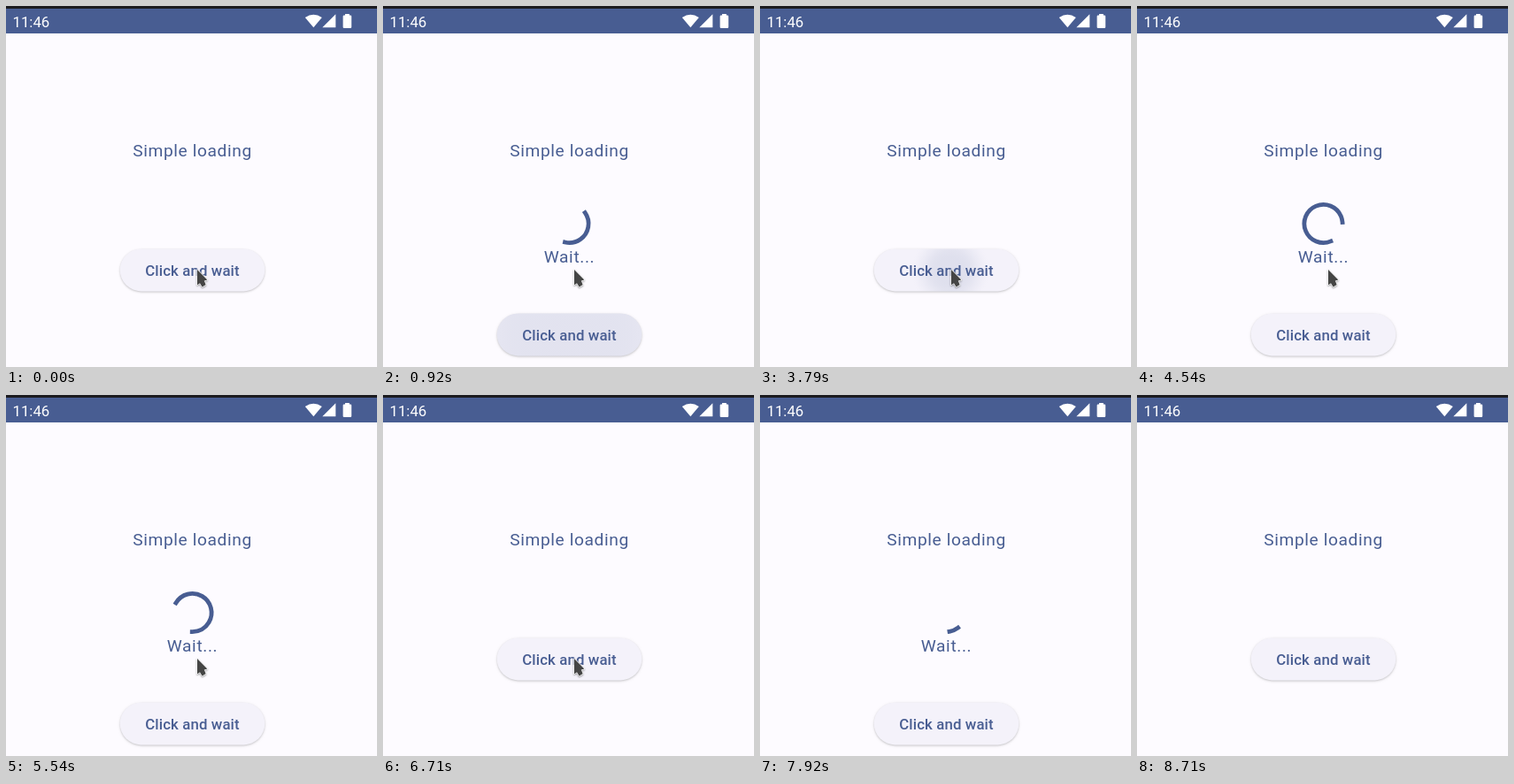
These frames come from a looping animation (419 px wide and 408 px high, 9.25 s). An HTML page with a canvas:

```html
<!DOCTYPE html>
<html lang="en">
<head>
<meta charset="utf-8">
<title>Simple loading</title>
<style>
  html, body { margin: 0; width: 100%; height: 100%; overflow: hidden; background: #fdfbff; }
  canvas { display: block; width: 419px; height: 408px; }
</style>
</head>
<body>
<canvas id="stage"></canvas>
<script>
const W = 419, H = 408, LOOP = 9250, MID = 210.5;
const PRIMARY = '#485d92', SURFACE = '#fdfbff', BUTTON = '#f4f2fa';
const FONT = 'Roboto, "Noto Sans", sans-serif';

// press: first visible ripple, show: spinner appears, last: spinner stops, hide: layout returns
const CLICKS = [
  { press: 580, show: 694, last: 2540, hide: 2630 },
  { press: 3790, show: 3845, last: 5710, hide: 5750 },
  { press: 6710, show: 6830, last: 8580, hide: 8710 }
];
const CLICK_LENGTH = 175;
const CURSOR_LEAVE = 6890, CURSOR_GONE = 6990;

const canvas = document.getElementById('stage');
const ctx = canvas.getContext('2d');
const dpr = window.devicePixelRatio || 1;
canvas.width = W * dpr;
canvas.height = H * dpr;

const clamp = x => Math.min(1, Math.max(0, x));
const rad = deg => deg * Math.PI / 180;

// cubic-bezier(0.4, 0, 0.2, 1)
function ease(x) {
  x = clamp(x);
  let lo = 0, hi = 1;
  for (let i = 0; i < 24; i++) {
    const s = (lo + hi) / 2, r = 1 - s;
    if (1.2 * r * r * s + 0.6 * r * s * s + s * s * s < x) lo = s; else hi = s;
  }
  return lo * lo * (3 - 2 * lo);
}

function polygon(points, fill) {
  ctx.beginPath();
  points.forEach(([x, y]) => ctx.lineTo(x, y));
  ctx.closePath();
  ctx.fillStyle = fill;
  ctx.fill();
}

function text(str, x, y, size, { weight = 400, spacing = 0, align = 'left', color = PRIMARY } = {}) {
  ctx.font = `${weight} ${size}px ${FONT}`;
  ctx.letterSpacing = spacing + 'px';
  ctx.textAlign = 'left';
  ctx.fillStyle = color;
  const left = align === 'center' ? x - ctx.measureText(str).width / 2 : x;
  ctx.fillText(str, left, y);
}

function statusBar() {
  ctx.fillStyle = '#1b1b1f';
  ctx.fillRect(0, 0, W, 3);
  ctx.fillStyle = PRIMARY;
  ctx.fillRect(0, 3, W, 28);
  text('11:46', 7.5, 23.5, 16.8, { color: '#fff' });

  ctx.fillStyle = '#fff';
  ctx.beginPath();
  ctx.moveTo(347.3, 24.3);
  ctx.lineTo(337.8, 13);
  ctx.quadraticCurveTo(347.3, 6.4, 356.8, 13);
  ctx.fill();
  polygon([[372.3, 9.2], [372.3, 24.2], [357.3, 24.2]], '#fff');
  ctx.beginPath();
  ctx.roundRect(380.6, 10.6, 9.6, 14.4, 1.2);
  ctx.rect(383, 9, 4.8, 2);
  ctx.fill();
}

function pill(y) {
  ctx.beginPath();
  ctx.roundRect(128.7, y, 163.6, 48, 24);
}

function ripple(age, top) {
  const progress = age < 450 ? 0.5 * ease(age / 450) : 0.5 + 0.5 * clamp((age - 450) / 375);
  const fade = Math.min(clamp(progress / 0.13), 1 - clamp((progress - 0.4) / 0.6));
  if (fade <= 0) return;
  const move = clamp(progress * 2);
  const x = 217 + (MID - 217) * move;
  const y = top + 25 - move;
  const radius = Math.max(1, 215 * progress);
  const glow = ctx.createRadialGradient(x, y, 0, x, y, radius * 1.5);
  for (let i = 0; i <= 8; i++) {
    const k = i / 8;
    const level = 1 - k * k * (3 - 2 * k);
    glow.addColorStop((1 + 2 * k) / 3, `rgba(72,93,146,${0.12 * fade * level})`);
  }
  pill(top);
  ctx.fillStyle = glow;
  ctx.fill();
}

function button(top, age) {
  ctx.save();
  ctx.shadowColor = 'rgba(0,0,0,0.22)';
  ctx.shadowBlur = 2.4 * dpr;
  ctx.shadowOffsetY = 1 * dpr;
  pill(top);
  ctx.fillStyle = BUTTON;
  ctx.fill();
  ctx.restore();
  if (age !== null) ripple(age, top);
  text('Click and wait', MID, top + 31, 16.8, { weight: 500, spacing: 0.12, align: 'center' });
}

function spinner(elapsed) {
  const cycle = Math.floor(elapsed / 1332);
  const phase = elapsed / 1332 - cycle;
  const head = 290 * ease(phase * 2);
  const tail = 290 * ease(phase * 2 - 1);
  const capAngle = 6.4;
  const start = -90 + 216 * cycle + 286 * phase + tail + capAngle;
  ctx.beginPath();
  ctx.arc(MID, 246, 21.6, rad(start), rad(start + Math.max(head - tail, 0.1)));
  ctx.lineWidth = 4.8;
  ctx.lineCap = 'square';
  ctx.strokeStyle = PRIMARY;
  ctx.stroke();
}

function cursor(t) {
  if (t >= CURSOR_GONE) return;
  const leave = clamp((t - CURSOR_LEAVE) / (CURSOR_GONE - CURSOR_LEAVE));
  ctx.save();
  ctx.translate(216 + 14 * leave, 298 - 154 * leave * leave);
  ctx.lineJoin = 'round';
  ctx.lineWidth = 1.6;
  ctx.strokeStyle = 'rgba(255,255,255,0.9)';
  ctx.shadowColor = 'rgba(0,0,0,0.3)';
  ctx.shadowBlur = 2 * dpr;
  ctx.shadowOffsetY = dpr;
  const arrow = [[0, 0], [11.3, 11.6], [7.8, 12.4], [9.6, 17], [5.6, 19.4], [3, 15.2], [0, 17.2]];
  polygon(arrow, '#454545');
  ctx.stroke();
  ctx.shadowColor = 'transparent';
  polygon(arrow, '#454545');
  ctx.restore();
}

function draw(t) {
  ctx.setTransform(dpr, 0, 0, dpr, 0, 0);
  ctx.fillStyle = SURFACE;
  ctx.fillRect(0, 0, W, H);
  statusBar();
  text('Simple loading', MID, 170, 19.2, { spacing: 0.6, align: 'center' });

  const click = CLICKS.find(c => t >= c.press && t < c.hide);
  const loading = click && t >= click.show;
  if (loading) {
    spinner(Math.min(t, click.last) - click.show);
    text('Wait...', MID, 290, 19.2, { spacing: 0.6, align: 'center' });
  }
  button(loading ? 347.4 : 274.4, click ? t - click.show + CLICK_LENGTH : null);
  cursor(t);
}

const begin = performance.now();
function tick() {
  draw((performance.now() - begin) % LOOP);
  requestAnimationFrame(tick);
}
tick();
</script>
</body>
</html>
```
